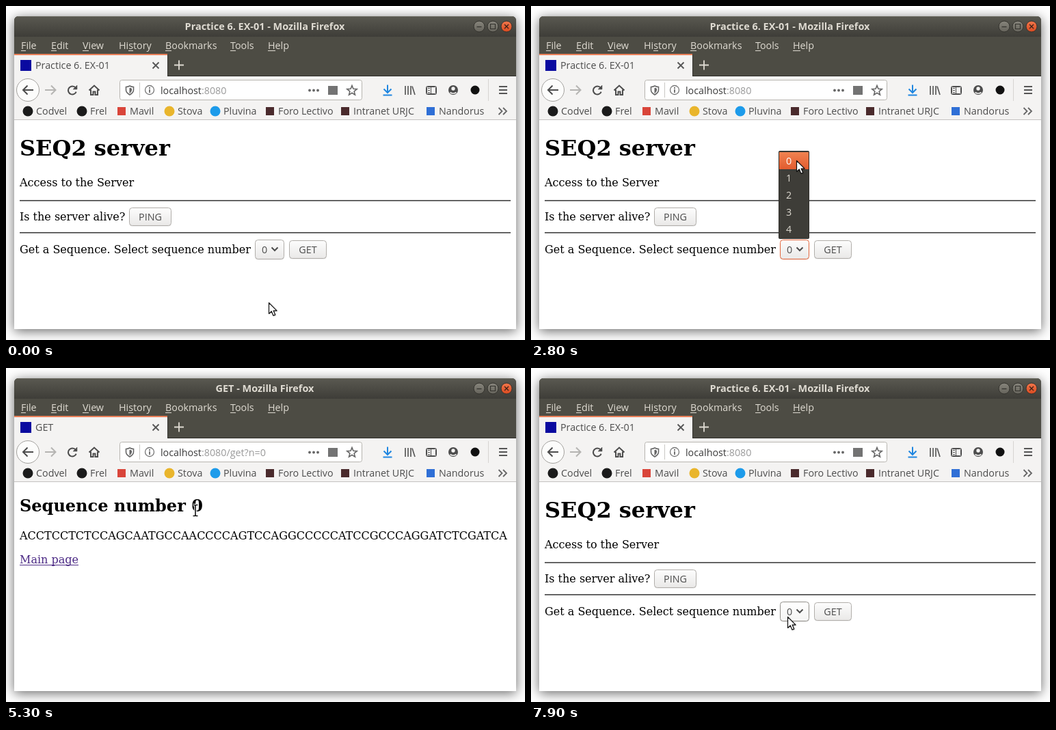
These frames come from a looping animation (759x489 px, 8000 ms). An HTML page with a canvas:

```html
<!DOCTYPE html>
<html lang="en">
<head>
<meta charset="utf-8">
<title>SEQ2 server</title>
<style>
html, body { margin: 0; width: 759px; height: 489px; overflow: hidden; background: #fff; }
canvas { display: block; }
</style>
</head>
<body>
<canvas id="stage" width="759" height="489"></canvas>
<script>
const g = document.getElementById('stage').getContext('2d');
const LOOP = 8000;
const UI = '14.3px "Open Sans", "Noto Sans", sans-serif';
const TITLE = 'bold 14.45px "Open Sans", "Noto Sans", sans-serif';
const serif = (size, weight = '') => `${weight} ${size}px "DejaVu Serif", serif`;
const BAR = '#f4f3f2', INK = '#4c4c4c', PALE = '#dfdbd2';

// Pointer path: time, x, y
const PATH = [
  [0, 384, 434], [1300, 384, 434], [1400, 384, 432], [1500, 384, 432],
  [1800, 392, 357], [2400, 392, 357], [2500, 394, 361], [2800, 388, 226],
  [3000, 388, 226], [3500, 463, 345], [3800, 441, 364], [3900, 441, 362],
  [4100, 441, 353], [4800, 441, 353], [5300, 277, 208], [5700, 288, 203],
  [5900, 277, 203], [6300, 277, 203], [6700, 101, 286], [7000, 101, 286],
  [7400, 346, 375], [7500, 346, 375], [7900, 375, 364], [8000, 375, 364]
];
const MENU = [['File', 22, 0], ['Edit', 66, 0], ['View', 112, 0], ['History', 165, 2],
  ['Bookmarks', 233, 0], ['Tools', 328, 0], ['Help', 383, 0]];
const MARKS = [['Codvel', 32, '#1b1b1b', 'o'], ['Frel', 111, '#1b1b1b', 'o'],
  ['Mavil', 169, '#d9453a', 's'], ['Stova', 239, '#e9b52c', 'o'],
  ['Pluvina', 306, '#1d9bea', 'o'], ['Foro Lectivo', 386, '#4a2a2c', 's'],
  ['Intranet URJC', 496, '#4a2a2c', 's'], ['Nandorus', 621, '#2f6fd6', 's']];

function pointer(t) {
  let i = 0;
  while (i < PATH.length - 2 && t >= PATH[i + 1][0]) i++;
  const [a, x, y] = PATH[i], [b, u, v] = PATH[i + 1];
  let k = (t - a) / (b - a);
  k = k * k * (3 - 2 * k);
  return { x: Math.round(x + (u - x) * k), y: Math.round(y + (v - y) * k) };
}

function text(s, x, y, color = INK, font = UI, align = 'left') {
  g.font = font;
  g.fillStyle = color;
  g.textAlign = align;
  g.fillText(s, x, y);
  return g.measureText(s).width;
}
function rect(x, y, w, h, color) {
  g.fillStyle = color;
  g.fillRect(x, y, w, h);
}
function shade(y0, y1, top, bottom) {
  const f = g.createLinearGradient(0, y0, 0, y1);
  f.addColorStop(0, top);
  f.addColorStop(1, bottom);
  return f;
}
function box(x, y, w, h, r, fill, stroke) {
  g.beginPath();
  g.roundRect(x + .5, y + .5, w - 1, h - 1, r);
  if (fill) { g.fillStyle = fill; g.fill(); }
  if (stroke) { g.strokeStyle = stroke; g.lineWidth = 1; g.stroke(); }
}
function disc(x, y, r, fill, stroke, width = 1) {
  g.beginPath();
  g.arc(x, y, r, 0, Math.PI * 2);
  if (fill) { g.fillStyle = fill; g.fill(); }
  if (stroke) { g.strokeStyle = stroke; g.lineWidth = width; g.stroke(); }
}
function line(d, color = INK, width = 2, fill) {
  const p = new Path2D(d);
  if (fill) { g.fillStyle = fill; g.fill(p); }
  g.strokeStyle = color;
  g.lineWidth = width;
  g.stroke(p);
}

function frame(title) {
  rect(0, 0, 759, 489, '#fff');
  g.save();
  g.shadowColor = 'rgba(0,0,0,.6)';
  g.shadowBlur = 17;
  g.shadowOffsetY = 3;
  g.beginPath();
  g.roundRect(12, 15, 734, 458, [6, 6, 0, 0]);
  g.fillStyle = '#4d4c44';
  g.fill();
  g.restore();

  g.beginPath();
  g.roundRect(12, 15, 734, 30, [6, 6, 0, 0]);
  g.fillStyle = shade(15, 45, '#5a5951', '#3e3d38');
  g.fill();
  rect(17, 15, 724, 1, '#6a695f');
  text(title, 378.5, 35, PALE, TITLE, 'center');

  for (const x of [692, 712, 732]) {
    const close = x === 732;
    disc(x, 30, 8, close ? shade(22, 38, '#f1774c', '#d94a20') : shade(22, 38, '#87857c', '#65635b'), '#34332e');
  }
  line('M688.5 30.5h7', '#34332e', 1.3);
  line('M708.5 26.5h7v7h-7z', '#34332e', 1.2);
  line('M729 27l6 6M735 27l-6 6', '#3c2118', 1.4);

  for (const [s, x, n] of MENU) {
    text(s, x, 63, PALE);
    const off = g.measureText(s.slice(0, n)).width;
    rect(Math.round(x + off), 65, Math.round(g.measureText(s[n]).width), 1, PALE);
  }
}

function tab(label, age) {
  rect(12, 102, 734, 1, '#2e2d29');
  rect(236, 71, 1, 32, '#35342f');
  rect(12, 70, 224, 33, BAR);
  if (age >= 100 && age < 400) {
    g.save();
    g.beginPath();
    g.rect(12, 72, 224, 31);
    g.clip();
    const k = age / 100 - 1;
    disc(29, 87, 28 + 67 * k, `rgba(48,146,224,${[.42, .2, .07][Math.floor(k)]})`);
    g.restore();
  }
  rect(12, 70, 224, 2, '#ea8059');
  rect(21, 79, 16, 16, '#0a0aa0');
  text(label, 43, 92);
  line('M214.5 82.5l9 9M223.5 82.5l-9 9', '#555', 1.8);
  line('M246 86.5h14M253 79.5v14', PALE, 1.8);
}

function toolbar(path) {
  rect(12, 103, 734, 64, BAR);
  rect(12, 166, 734, 1, '#c4c2c0');

  disc(32, 123, 16.5, '#fcfcfb', '#a3a19e');
  line('M40 123H25.5M31.5 116.5L25 123l6.5 6.5');
  line('M57 123h14.5M66 116.5l6.5 6.5-6.5 6.5', '#b5b4b2');
  g.beginPath();
  g.arc(97, 123.5, 6, .35, 5.6);
  g.strokeStyle = INK;
  g.lineWidth = 2;
  g.stroke();
  line('M104 116v6h-6z', INK, .5, INK);
  line('M121.5 123.5l7.5-7 7.5 7M124 122.5v7.5h3.5v-4.5h3v4.5h3.5v-7.5');

  box(166, 108, 355, 30, 3, '#fff', '#b7b4af');
  line('M181 117q3 1.5 5.5 1.5v4.5q0 4-5.5 7-5.5-3-5.5-7v-4.5q2.5 0 5.5-1.5z', '#666', 1.6);
  line('M181 120v7.500q2.500-2 2.500-4.500v-2z', '#666', 1, '#666');
  rect(195, 112, 1, 22, '#c9c7c4');
  disc(210, 123, 6.5, null, '#777', 1.3);
  rect(209, 122, 2, 5, '#777');
  rect(209, 119, 2, 2, '#777');
  const w = text('localhost', 226, 129, '#3a3a3a');
  text(path, 226 + w, 129, '#999');
  for (const x of [444, 450, 456]) disc(x, 123.5, 1.9, '#666');
  rect(471, 117, 14, 13, '#737373');
  g.beginPath();
  for (let i = 0; i < 10; i++) {
    const r = i % 2 ? 3.3 : 7.5, a = i * Math.PI / 5 - Math.PI / 2;
    g.lineTo(506 + r * Math.cos(a), 124 + r * Math.sin(a));
  }
  g.closePath();
  g.strokeStyle = '#666';
  g.lineWidth = 1.6;
  g.stroke();

  line('M558 115.500v11M552.500 121.500l5.500 5.500 5.500-5.500M551.500 130.500h13', '#1f86e0');
  line('M584 117v13M588 117v13M592 117v13M594 117.500l4 12.500', '#5b5b5b', 1.7);
  box(614, 117, 16, 13, 2, null, INK);
  box(615, 118, 14, 11, 1, null, INK);
  rect(621, 117, 1, 13, INK);
  for (const y of [120, 123, 126]) rect(617, y, 3, 1, INK);
  disc(654, 123, 7, INK);
  disc(654, 121, 2.7, BAR);
  line('M649.500 126.500q4.500 3 9 0', BAR, 1.6);
  disc(686, 123, 6.5, '#111');
  rect(705, 107, 1, 32, '#d6d4d1');
  for (const y of [117, 122, 127]) rect(721, y, 12, 2, '#555');

  for (const [s, x, color, shape] of MARKS) {
    if (shape === 'o') disc(x, 154, 7.5, color);
    else rect(x - 6, 148, 12, 12, color);
    text(s, x + 12, 159);
  }
  line('M720.500 149l5 5-5 5M727 149l5 5-5 5', '#666', 1.8);
}

function button(x, y, w, h, hover, edge) {
  box(x, y + 1, w, h, 4, 'rgba(0,0,0,.12)');
  box(x, y, w, h, 4, hover ? shade(y, y + h, '#fff', '#f4f4f3') : shade(y, y + h, '#fdfdfd', '#e9e8e7'),
    edge || (hover ? '#918e89' : '#b1aeaa'));
}

function home(t, p) {
  const open = t >= 1900 && t < 3100;
  const over = (x, y, w, h) => p.x >= x && p.x < x + w && p.y >= y && p.y < y + h;
  text('SEQ2 server', 20, 219, '#000', serif(32, 'bold'));
  text('Access to the Server', 20, 264, '#000', serif(16));
  for (const y of [284, 331]) {
    rect(20, y, 718, 1, '#505050');
    rect(20, y + 1, 718, 1, '#7c7c7c');
  }
  text('Is the server alive?', 20, 314, '#000', serif(16));
  button(180, 295, 62, 27);
  text('PING', 211, 314, INK, UI, 'center');
  text('Get a Sequence. Select sequence number', 20, 362, '#000', serif(16));
  const edge = open ? '#e2643a' : t >= 3100 && t < 4300 ? '#cf9270' : null;
  button(364, 342, 43, 29, over(364, 342, 43, 29), edge);
  text('0', 374, 362);
  line('M388.500 353.500l4.500 4.500 4.500-4.500', INK, 2);
  button(414, 343, 55, 27, !open && over(414, 343, 55, 27));
  text('GET', 441.5, 362, INK, UI, 'center');
  if (open) options(p.y);
}

function options(y) {
  const picked = y > 338 ? 0 : Math.max(0, Math.floor((y - 214) / 25));
  box(362, 212, 45, 129, 1, '#3e3d38', '#2f2e2a');
  rect(363, 214 + picked * 25, 43, 25, shade(214 + picked * 25, 239 + picked * 25, '#f08250', '#e25c2f'));
  for (let i = 0; i < 5; i++) text(String(i), 373, 232 + i * 25, i === picked ? '#fff' : PALE);
}

function sequence(t) {
  text('Sequence number 0', 20, 210, '#000', serif(24, 'bold'));
  text('ACCTCCTCTCCAGCAATGCCAACCCCAGTCCAGGCCCCCATCCGCCCAGGATCTCGATCA', 20, 251, '#000', serif(16));
  const active = t >= 6900;
  const color = active ? '#d5330f' : '#4c2a85';
  const w = text('Main page', 20, 286, color, serif(16));
  rect(20, 288, Math.round(w), 1, color);
  if (active) {
    g.setLineDash([1, 1]);
    box(19, 270, 88, 21, 0, null, '#333');
    g.setLineDash([]);
  }
  if (t >= 6800) {
    g.globalAlpha = t < 6900 ? .12 : .32;
    box(11, 451, 107, 23, [0, 3, 0, 0], '#f0efee', '#b5b3b0');
    text('localhost:8080', 16, 468, '#444');
    g.globalAlpha = 1;
  }
}

function cursor(kind, p) {
  g.save();
  g.translate(p.x, p.y);
  g.lineJoin = 'round';
  if (kind === 'beam') {
    const d = 'M-3.500-7.500h2.500l1 1 1-1h2.500M0-6.500v14M-3.500 8.500h2.500l1-1 1 1h2.500';
    line(d, '#fff', 3.6);
    line(d, '#111', 1.6);
  } else {
    g.shadowColor = 'rgba(0,0,0,.35)';
    g.shadowBlur = 2;
    g.shadowOffsetX = g.shadowOffsetY = 1;
    const d = kind === 'hand'
      ? 'M-1.500 9V1q0-1.500 1.500-1.500T1.500 1v4.500l5 .8q2 .5 2 2.500v3l-1 3.500H-.5l-4-5q-.5-2 1-2z'
      : 'M.5.500v16l3.800-3.500 2.600 6.300 2.800-1.200-2.600-6h5z';
    g.fillStyle = '#fff';
    g.fill(new Path2D(d));
    g.shadowColor = 'transparent';
    line(d, '#111', 1.2);
    if (kind === 'hand') line('M2 9v2.500M4.500 9v2.500M7 9v2.500', '#777', .8);
  }
  g.restore();
}

function draw(now) {
  const t = Math.floor(now % LOOP / 100) * 100;
  const isHome = t < 4300 || t >= 7000;
  const p = pointer(t);
  const name = isHome ? 'Practice 6. EX-01' : 'GET';
  frame(name + ' - Mozilla Firefox');
  tab(name, t >= 7000 ? t - 7000 : t - 4300);
  toolbar(isHome ? ':8080' : ':8080/get?n=0');
  rect(12, 167, 734, 306, '#fff');
  if (isHome) home(t, p);
  else sequence(t);
  const onText = !isHome && (p.y > 238 && p.y < 257 || p.y > 188 && p.y < 217 && p.x < 292);
  const onLink = !isHome && p.y > 270 && p.y < 291 && p.x < 108;
  cursor(onLink ? 'hand' : onText ? 'beam' : 'arrow', p);
}

const start = performance.now();
function tick() {
  draw(performance.now() - start);
  requestAnimationFrame(tick);
}
tick();
</script>
</body>
</html>
```
